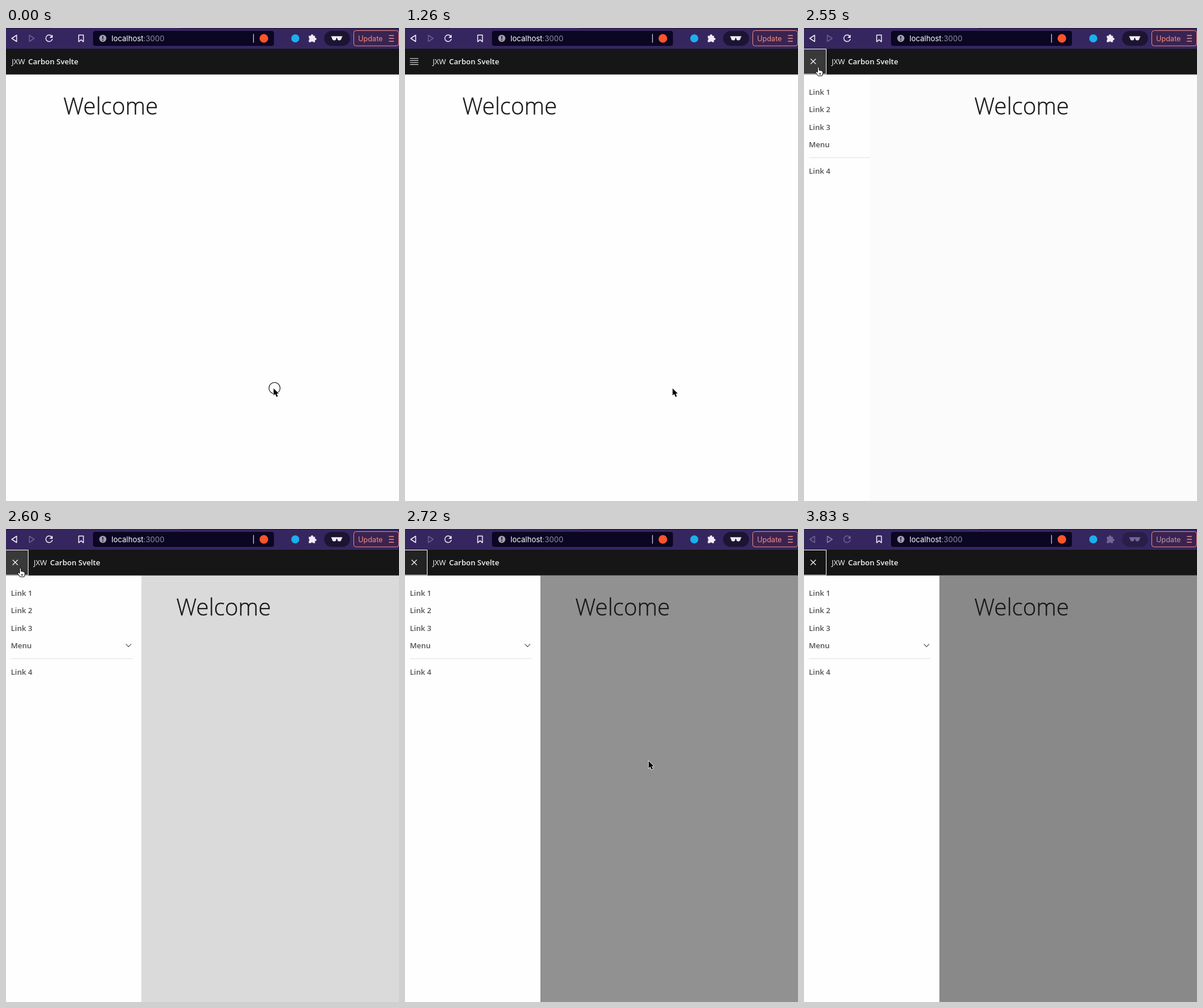
An HTML page for the animation above (3.93 s loop, 682 px wide and 821 px high).

```html
<!DOCTYPE html>
<html lang="en">
<head>
<meta charset="utf-8">
<title>Navigation demo</title>
<style>
  html, body { margin: 0; width: 100%; height: 100%; overflow: hidden; background: #fefefe; }
  svg { display: block; width: 682px; height: 821px; font: 13px "Open Sans", "Noto Sans", sans-serif; }
  .ui { font-family: Inter, Roboto, sans-serif; }
  .bold { font-weight: 600; }
  .line { fill: none; stroke: #f1edf8; stroke-width: 1.5; stroke-linejoin: round; stroke-linecap: round; }
  .solid { fill: #f1edf8; }
  #forward { stroke: #6c5f90; }
  #pill { fill: #1b1532; }
  #update { fill: #f28b82; }
  .blur .fade { stroke: #6f6292; }
  .blur .solid { fill: #736696; }
  .blur #forward { stroke: #887ca6; }
  .blur #pill { fill: #291e4a; }
  .blur #update { fill: #b698a9; }
</style>
</head>
<body>
<svg id="stage" viewBox="0 0 682 821">
  <defs>
    <clipPath id="navClip"><rect id="navEdge" y="81" width="0" height="740"/></clipPath>
  </defs>

  <!-- page -->
  <rect width="682" height="821" fill="#fefefe"/>
  <text id="welcome" x="99.5" y="150" font-size="39.7" font-weight="300" fill="#161616" stroke="#161616" stroke-width=".35">Welcome</text>
  <rect id="overlay" y="81" width="682" height="740" fill="#161616" opacity="0"/>

  <!-- side navigation -->
  <g clip-path="url(#navClip)">
    <rect y="81" width="235" height="740" fill="#fefefe"/>
    <g class="bold" fill="#525252">
      <text x="8.5" y="116">Link 1</text>
      <text x="8.5" y="146">Link 2</text>
      <text x="8.5" y="176.5">Link 3</text>
      <text x="8.5" y="206.5">Menu</text>
      <text x="8.5" y="253">Link 4</text>
    </g>
    <path d="M208 199.7l4.6 4.6 4.6-4.6" fill="none" stroke="#525252" stroke-width="1.2"/>
    <path d="M8.5 225H220" stroke="#dedede"/>
  </g>

  <!-- page header -->
  <rect y="36" width="682" height="45" fill="#161616"/>
  <path d="M0 80.5H682" stroke="#5a5a5a"/>
  <rect id="hover" y="36" width="38.5" height="44.5" fill="#393939" opacity="0"/>
  <rect id="focus" x="-6" y="36.5" width="44.5" height="43.5" fill="none" stroke="#fff"/>
  <path id="menu" d="M8.6 53h14.6m-14.6 3.5h14.6m-14.6 3.5h14.6m-14.6 3.5h14.6" stroke="#f4f4f4" stroke-width="1.15"/>
  <path id="close" d="M11.5 53.5l9 9m0-9l-9 9" stroke="#fff" stroke-width="1.2"/>
  <g id="title" fill="#f4f4f4">
    <text x="10" y="63">JXW</text>
    <text x="38.5" y="63" class="bold">Carbon Svelte</text>
  </g>

  <!-- browser bar -->
  <rect width="682" height="36" fill="#36265f"/>
  <path d="M0 .5H78M303 .5H682" stroke="#1c1435"/>
  <path class="line fade" d="M18.5 12.5v11l-8.5-5.5z"/>
  <path class="line" id="forward" d="M40.5 12.5v11l8.5-5.5z"/>
  <g id="reload">
    <path class="line fade" d="M79.3 14.2a5.7 5.7 0 1 0 1 5.3"/>
    <path class="solid" d="M81 11.5v5.6h-5.6z"/>
  </g>
  <path id="stop" class="line" d="M70.5 13.5l9 9m0-9l-9 9"/>
  <path class="line" d="M126.2 12.2h8.2v11.6l-4.1-3.4-4.1 3.4z"/>
  <rect x="151" y="5" width="314" height="26" rx="4" fill="#0b0622"/>
  <circle cx="168" cy="18" r="6.2" fill="#a09da9"/>
  <path d="M168 14.3v4.5m0 1.5v1.6" stroke="#0b0622" stroke-width="1.6"/>
  <text class="ui" x="183" y="22.6" fill="#fff">localhost<tspan fill="#918d9f">:3000</tspan></text>
  <path d="M429.5 10.5v15" stroke="#d9d6e2" stroke-width="1.2"/>
  <circle cx="447.5" cy="18" r="7.5" fill="#fb542b"/>
  <circle cx="502" cy="18" r="7" fill="#1ab0ee"/>
  <path class="solid" d="M526 13.5h3.2a2 2 0 1 1 3.8 0h3.2v3.6a2 2 0 1 1 0 3.8v3.6h-3.4a1.9 1.9 0 0 0-3.6 0h-3.7v-3.7a1.9 1.9 0 0 0 0-3.5v-3.8z"/>
  <rect id="pill" x="552" y="5" width="45" height="26" rx="13"/>
  <path class="solid" d="M564.5 14.3h19v2h-1q-.4 5.3-4.2 5.3-3.3 0-3.7-4.6h-1.2q-.4 4.6-3.7 4.6-3.8 0-4.2-5.3h-1z"/>
  <rect x="603.5" y="4.5" width="78" height="26.5" rx="4" fill="#3a2350" stroke="#f28b82"/>
  <text id="update" class="ui" x="611" y="22.5" font-size="12.5">Update</text>
  <path d="M664.5 13h8.5m-8.5 5h8.5m-8.5 5h8.5" stroke="#f28b82" stroke-width="1.5"/>

  <!-- pointer -->
  <circle id="ring" cx="466" cy="625" r="9.7" fill="none" stroke="#000" stroke-width="1.1"/>
  <g id="pointer" stroke-linejoin="round">
    <path id="arrow" d="M.4.4v12.4l2.8-2.6 2.2 5 2.3-1-2.1-4.8h3.8z" fill="#000" stroke="#fff" stroke-width="1.6" paint-order="stroke"/>
    <path id="hand" d="M-1.5 9V1.2Q-1.4-.2-.2-.2T1.1 1.2V5.5q1.2-1 2.3.5 1.3-.9 2.2.6 2.2-.6 2.2 1.6v2.6l-1.3 4.2H-.7L-4.4 9.6q-.9-1.8.6-2.1.9-.1 2.3 1.5zM1.8 10v3m2-3v3" fill="#fff" stroke="#000"/>
  </g>
</svg>

<script>
  const LOOP = 3930, FRAME = 56.25, PHASE = 2150;

  // A bend below 1 lets y run ahead of x, above 1 lets it lag.
  const moves = [
    { from: 1690, to: 2222, x: 24, y: 73, bend: .8 },
    { from: 2260, to: 2430, x: 25, y: 68, bend: 1 },
    { from: 2600, to: 2750, x: 496, y: 478, bend: 1.2 },
    { from: 3020, to: 3170, x: 625, y: 765, bend: .8 },
  ];

  const $ = id => document.getElementById(id);
  const show = (id, on) => { $(id).style.display = on ? "" : "none"; };
  const set = (id, name, value) => $(id).setAttribute(name, value);
  const ramp = (t, from, to) => Math.min(1, Math.max(0, (t - from) / (to - from)));
  const smooth = u => u * u * (3 - 2 * u);

  // cubic-bezier(.5, 0, .1, 1), solved by bisection
  function overlayEase(u) {
    let lo = 0, hi = 1;
    for (let i = 0; i < 20; i++) {
      const s = (lo + hi) / 2, r = 1 - s;
      if (1.5 * s * r * r + .3 * s * s * r + s * s * s < u) lo = s;
      else hi = s;
    }
    return smooth(lo);
  }

  function pointerAt(t) {
    let x = 464, y = 625;
    for (const m of moves) {
      const s = smooth(ramp(t, m.from, m.to));
      x += (m.x - x) * s;
      y += (m.y - y) * s ** m.bend;
    }
    return `translate(${x} ${y})`;
  }

  function draw(now) {
    const t = PHASE + Math.floor((now - PHASE) / FRAME) * FRAME;
    const open = now >= 2540;
    const hasMenu = now >= 360 && now < 840 || now >= 1260;
    const loading = now >= 720 && now < 960;
    const pointing = now >= 2260 && t <= 2600;

    $("stage").classList.toggle("blur", now >= 3830);
    show("ring", now < 60);
    show("reload", !loading);
    show("stop", loading);
    show("menu", hasMenu && !open);
    show("close", open);
    show("focus", now >= 2430);
    show("pointer", now < 3240);
    show("hand", pointing);
    show("arrow", !pointing);

    set("title", "transform", `translate(${hasMenu ? 38 : 0} 0)`);
    set("welcome", "x", open ? 295.5 : 99.5);
    set("navEdge", "width", 235 * ramp(t, 2490, 2600));
    set("overlay", "opacity", .5 * overlayEase(ramp(t, 2511, 2811)));
    set("hover", "opacity", ramp(t, 2270, 2380) - ramp(t, 2650, 2750));
    set("pointer", "transform", pointerAt(t));
  }

  function tick() {
    draw(performance.now() % LOOP);
    requestAnimationFrame(tick);
  }
  tick();
</script>
</body>
</html>
```
